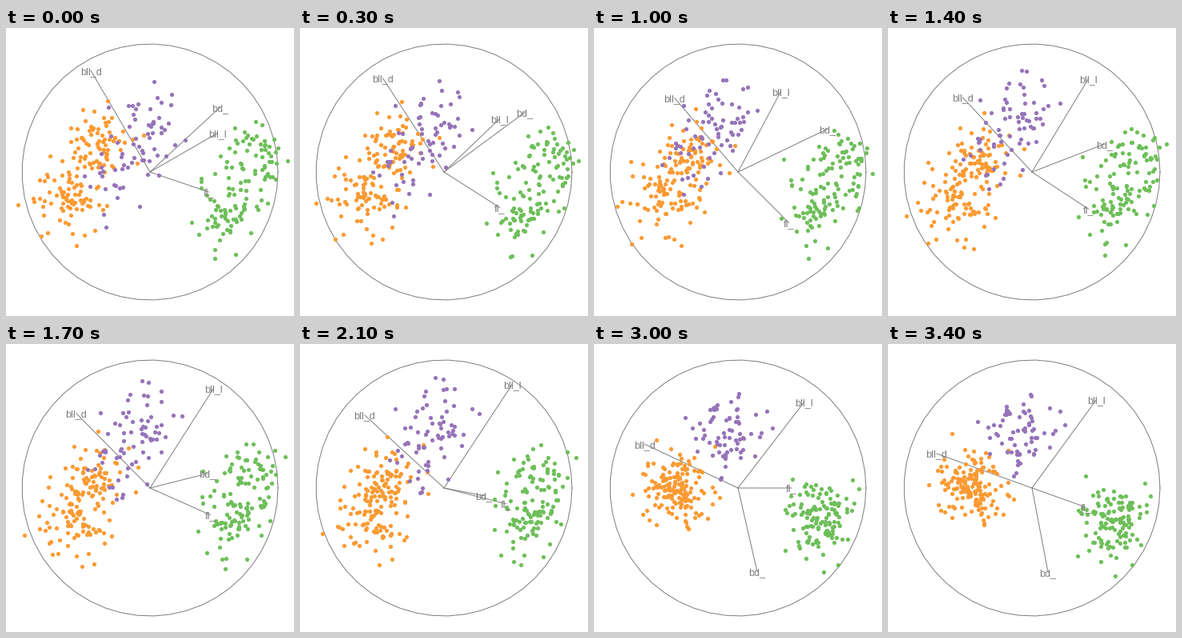
Animation of 360x360 px, one loop 3500 ms. Source, as a matplotlib script:

```python
import numpy as np
import matplotlib.pyplot as plt
from matplotlib.animation import FuncAnimation

SIZE, CENTER, RADIUS = 360, 180, 160
FRAMES, INTERVAL = 35, 100
UNIT = 57    # pixels per standard deviation
GREY = "#7f7f7f"
LABELS = ["bll_l", "bll_d", "fl_", "bd_"]

# Key poses of the tour: where each axis points (x, y up).
POSES = np.array([
    [(84, 48), (-74, 126), (73, -25), (87, 80)],
    [(43, 93), (-78, 95), (62, -74), (120, 60)],
    [(85, 129), (-98, 94), (79, -22), (53, 1)],
    [(83, 108), (-117, 55), (67, 0), (24, -105)],
    [(80, 110), (-119, 43), (67, -24), (20, -105)],
])
STEPS = [0, 8, 20, 30, 31, 34]
STAGES = [0, 1, 2, 3, 3, 4]    # rests one step on the fourth pose

# colour, count, centre in standard deviations
GROUPS = [
    ("#fb9a32", 151, (-.94, .61, -.78, -.62)),
    ("#6dbf59", 123, (.66, -1.10, 1.16, 1.09)),
    ("#9673b9", 68, (.90, .64, -.37, -.58)),
]
SHIFT = np.array([.35, .39, .25, .42])    # each group has a large and a small half
SPREAD = .4


def make_cloud(rng, count, centre):
    half = np.resize([1, -1], (count, 1))
    noise = rng.standard_normal((count, 4))
    return centre + half * SHIFT + SPREAD * (noise - noise.mean(axis=0))


def basis(step):
    """Orthonormal 4x2 projection on the way from pose to pose."""
    stage = np.interp(step, STEPS, STAGES)
    k = min(int(stage), len(POSES) - 2)
    mix = POSES[k] + (POSES[k + 1] - POSES[k]) * (stage - k)
    u, _, v = np.linalg.svd(mix, full_matrices=False)
    return u @ v


def to_stage(xy):
    return CENTER + xy * [1, -1]


fig = plt.figure(figsize=(SIZE / 72, SIZE / 72), dpi=72, facecolor="white")
ax = fig.add_axes([0, 0, 1, 1])
ax.set(xlim=(0, SIZE), ylim=(SIZE, 0))
ax.axis("off")

theta = np.linspace(0, 2 * np.pi, 50)
ring = to_stage(RADIUS * np.column_stack([np.cos(theta), np.sin(theta)]))
ax.plot(*ring.T, color=GREY, lw=1)

spokes = [ax.plot([], [], color=GREY, lw=1)[0] for _ in LABELS]
names = [ax.text(0, 0, s, color=GREY, family="Liberation Sans", size=12.6,
                 ha="center", va="baseline") for s in LABELS]

rng = np.random.default_rng(7)
clouds = [(ax.plot([], [], "o", color=color, ms=5.2, mew=0)[0],
           make_cloud(rng, count, centre)) for color, count, centre in GROUPS]


def draw(step):
    axes = basis(step)
    for spoke, name, (x, y) in zip(spokes, names, to_stage(RADIUS * axes)):
        spoke.set_data([CENTER, x], [CENTER, y])
        name.set_position((x, y + 4.5))
    for dots, data in clouds:
        dots.set_data(*to_stage(UNIT * data @ axes).T)
    return spokes + names + [dots for dots, _ in clouds]


anim = FuncAnimation(fig, draw, frames=FRAMES, interval=INTERVAL,
                     repeat=True, repeat_delay=0)
plt.show()
```
